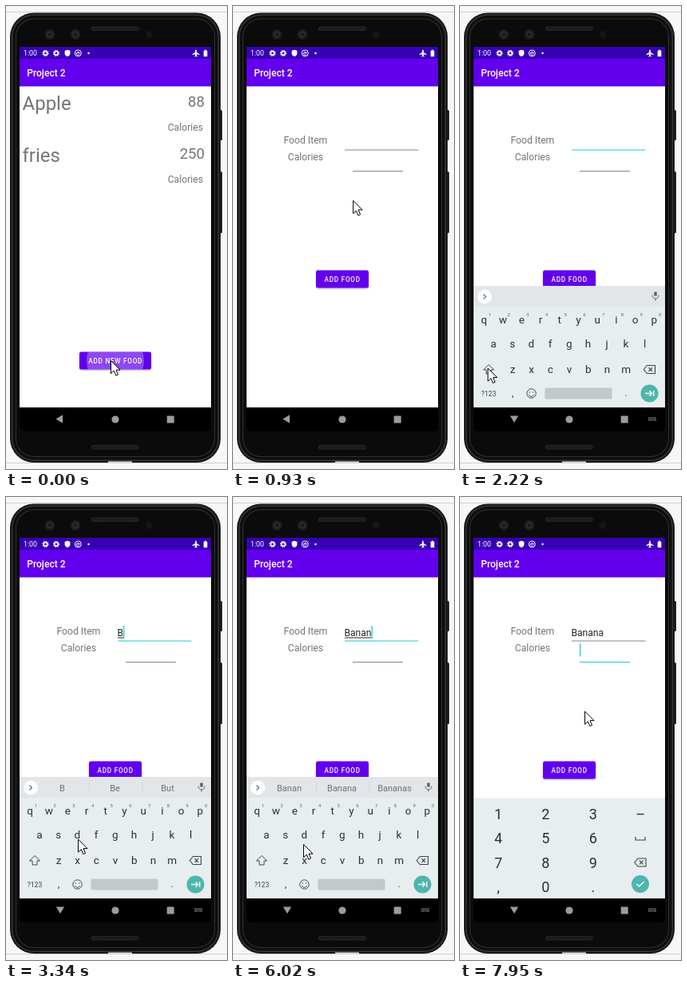
Recreate the animation shown at these times as an HTML page with a canvas. Size 277 by 579 pixels, loop 8000 ms.

```html
<!DOCTYPE html>
<html lang="en">
<head>
<meta charset="utf-8">
<title>Food app</title>
<style>
  html, body { margin: 0; width: 100%; height: 100%; overflow: hidden; background: #f7f7f7; }
  canvas { display: block; width: 277px; height: 579px; }
</style>
</head>
<body>
<canvas id="stage"></canvas>
<script>
const W = 277, H = 579, LOOP = 8000;
const canvas = document.getElementById('stage');
const ctx = canvas.getContext('2d');
const ratio = window.devicePixelRatio || 1;
canvas.width = W * ratio;
canvas.height = H * ratio;

const PURPLE = '#6200ee', DARK = '#3700b3', GREY = '#757575', TEAL = '#1fcfbd',
      KEY = '#37474f', BOARD = '#e8edf0', ENTER = '#4db6ac';

const CLOCK = [[0, 0], [9, 1170], [17, 2220], [25, 3340], [36, 4820], [44, 5900], [52, 6920], [59, 7950], [60, 8085]];
// Pointer path: [step, x, y]
const POINTER = [[0, 131.5, 443.5], [3, 131.5, 443.5], [5, 134, 380], [8, 159, 175], [9, 159.5, 163], [12, 159.5, 163],
  [16, 40, 445], [17, 35, 453], [18, 35, 453], [21, 134, 456], [23, 134, 456], [25, 90.5, 428], [27, 43, 427],
  [29, 43, 427], [31, 182, 454], [32, 182, 454], [34, 103.5, 441], [36, 43, 428], [37, 39, 428], [38, 39, 428],
  [41, 182, 467], [42, 182, 467], [45, 88.5, 434.5], [47, 37, 428], [49, 37, 428], [52, 38, 471], [53, 40, 472],
  [56, 187, 190], [57, 187, 190], [58, 182, 205], [59, 156.5, 268]];
// Typing: [step, text, suggestions]
const TYPING = [[10, '', []], [23, 'B', ['B', 'Be', 'But']], [29, 'Ba', ['Ba', 'Be', 'Bad']],
  [32, 'Ban', ['Ban', 'Can', 'Bank']], [37, 'Bana', ['Bana', 'Banana', 'Bananas']],
  [42, 'Banan', ['Banan', 'Banana', 'Bananas']], [49, 'Banana', ['Banana', 'Banana', 'Bananas']]];
const entryAt = step => TYPING.findLast(e => e[0] <= step) || TYPING[0];

// Piecewise linear lookup of column `out` by column `by`
function track(list, value, by = 0, out = 1) {
  const i = list.findIndex(p => p[by] > value);
  if (i < 0) return list[list.length - 1][out];
  if (i === 0) return list[0][out];
  const a = list[i - 1], b = list[i];
  return a[out] + (b[out] - a[out]) * (value - a[by]) / (b[by] - a[by]);
}

function rect(x, y, w, h, color, radius = 0) {
  ctx.fillStyle = color;
  ctx.beginPath();
  ctx.roundRect(x, y, w, h, radius);
  ctx.fill();
}
function disc(x, y, r, color) {
  ctx.fillStyle = color;
  ctx.beginPath();
  ctx.arc(x, y, r, 0, 7);
  ctx.fill();
}
function text(s, x, y, size, color, align = 'left', weight = 400, spacing = 0) {
  ctx.font = `${weight} ${size}px Roboto, sans-serif`;
  ctx.letterSpacing = spacing + 'px';
  ctx.textAlign = align;
  ctx.fillStyle = color;
  ctx.fillText(s, x, y);
}
function shape(d, x, y, { fill, stroke, width = 1, turn = 0 }) {
  ctx.save();
  ctx.translate(x, y);
  ctx.rotate(turn);
  const path = new Path2D(d);
  if (fill) { ctx.fillStyle = fill; ctx.fill(path); }
  if (stroke) { ctx.strokeStyle = stroke; ctx.lineWidth = width; ctx.stroke(path); }
  ctx.restore();
}
function zoomed(scale, draw) {
  ctx.save();
  ctx.translate(137, 291.5);
  ctx.scale(scale, scale);
  ctx.translate(-137, -291.5);
  draw();
  ctx.restore();
}

function drawPhone() {
  rect(0, 0, W, H, '#f7f7f7');
  rect(0, 7, W, 1, '#cfcfcf');
  rect(0, 571, W, 1, '#cfcfcf');
  rect(266, 130, 5, 38, '#222', 1.5);
  rect(266, 207, 5, 77, '#222', 1.5);
  rect(5, 8.5, 264, 562.5, '#161616', 30);
  for (const [inset, color] of [[2, '#363636'], [3.5, '#0e0e0e'], [7, '#303030'], [8, '#0b0b0b']])
    rect(5 + inset, 8.5 + inset, 264 - 2 * inset, 562.5 - 2 * inset, color, 30 - inset);
  rect(128, 569.5, 30, 2, '#dcdcdc');
  for (const y of [25.5, 549]) {
    rect(107, y, 60, 5.5, '#262626', 2.5);
    for (let x = 109; x < 166; x += 2) rect(x, y + 1, 1, 3.5, '#111');
  }
  for (const x of [55, 87]) {
    disc(x, 35.5, 6.5, '#1d1d1d');
    disc(x, 35.5, 4, '#2c2c2c');
    disc(x, 35.5, 2, '#151515');
  }
  disc(179.5, 35.5, 4.5, '#161616');
}

function drawWindow(content) {
  rect(17, 51, 240, 15.5, DARK);
  rect(17, 66, 240, 35, PURPLE);
  rect(17, 100.5, 240, 402, '#fff');
  rect(17, 502, 240, 30, '#000');
  text('Project 2', 26.2, 88, 12.1, '#fff', 'left', 500);
  content();
}

function button(label, x, y, w, rippleRadius) {
  ctx.save();
  ctx.shadowColor = 'rgba(0,0,0,.3)';
  ctx.shadowBlur = 2.5 * ratio;
  ctx.shadowOffsetY = ratio;
  rect(x, y, w, 22, PURPLE, 2.3);
  ctx.restore();
  if (rippleRadius) {
    ctx.save();
    ctx.beginPath();
    ctx.roundRect(x, y, w, 22, 2.3);
    ctx.clip();
    disc(x + w / 2, y + 11, rippleRadius, 'rgba(255,255,255,.28)');
    ctx.restore();
  }
  text(label, x + w / 2 + .2, y + 14.6, 8.2, '#fff', 'center', 500, .73);
}

function drawList(step) {
  [['Apple', '88', 0], ['fries', '250', 65]].forEach(([food, amount, dy]) => {
    text(food, 20.5, 130 + dy, 24, GREY);
    text(amount, 249, 125.5 + dy, 18.6, GREY, 'right');
    text('Calories', 247, 156 + dy, 12.2, GREY, 'right');
  });
  button('ADD NEW FOOD', 92, 432.5, 90, 36 + step * 10);
}

function drawForm(step) {
  const onCalories = step >= 58, onFood = step >= 10 && !onCalories;
  text('Food Item', 118.3, 172.4, 12.2, GREY, 'right');
  text('Calories', 113.1, 193.2, 12.2, GREY, 'right');
  const [typedAt, word] = entryAt(step);
  text(word, 139.5, 174, 12.1, '#222');
  const end = 139.5 + (word ? ctx.measureText(word).width : 0);
  if (onFood && word) rect(140, 175.5, end - 140, 1, '#222');
  rect(140, 179.5, 92.5, 1, onFood ? TEAL : '#858585');
  rect(150, 206, 63, 1, onCalories ? TEAL : '#858585');
  const since = (step - (onCalories ? 58 : typedAt)) * 134;
  if (since % 1000 < 500) {
    if (onFood) rect(end, 161, 1.3, 16.5, TEAL);
    if (onCalories) rect(150, 183, 1.3, 16.5, TEAL);
  }
  button('ADD FOOD', 104, 330.6, 66);
}

function backspace(x, y) {
  shape('M-7.2 0L-3.2-5H7V5H-3.2ZM-1-2.3L3.6 2.3M3.6-2.3L-1 2.3', x, y, { stroke: KEY, width: 1.1 });
}

function drawLetters(step) {
  const upper = step >= 18 && step < 23;
  rect(17, 350, 240, 152, BOARD);
  rect(17, 350, 240, 26, '#e2e6e9');
  disc(31, 363.5, 9, '#fff');
  shape('M-1.5-3L1.5 0L-1.5 3', 31, 363.5, { stroke: '#5f6a70', width: 1.1 });
  shape('M0-5V0', 245, 362.5, { stroke: '#596268', width: 3.4 });
  shape('M-4-1C-4 5 4 5 4-1M0 3.5V6', 245, 362.5, { stroke: '#596268' });
  entryAt(step)[2].forEach((s, i) => {
    text(s, 70.5 + 66 * i, 367.7, 11, '#66737a', 'center');
    if (i) rect(38 + 66.3 * i, 356, .8, 15, '#cdd2d5');
  });
  ['qwertyuiop', 'asdfghjkl', 'zxcvbnm'].forEach((row, r) => [...row].forEach((c, i) => {
    const x = [30, 42, 66][r] + 23.7 * i;
    text(upper ? c.toUpperCase() : c, x, [397, 427.3, 458.5][r], 13.5, '#263238', 'center');
    if (!r) text((i + 1) % 10, x + 7.5, 388.2, 6, '#5d6a70', 'center');
  }));
  shape('M0-6L6.5 .5H3V5.5H-3V.5H-6.5Z', 36, 454.5, { stroke: KEY, fill: upper ? KEY : '' });
  backspace(237.5, 454.5);
  text('?123', 36, 488, 8.6, KEY, 'center');
  text(',', 66, 488, 13, KEY, 'center');
  text('.', 208, 488, 13, KEY, 'center');
  shape('M5.7 0A5.7 5.7 0 1 1-5.7 0A5.7 5.7 0 1 1 5.7 0M-3 1.5C-2 4.5 2 4.5 3 1.5M-2.8-1.5h1.4M1.4-1.5h1.4', 89.5, 484.5,
    { stroke: KEY });
  rect(106.5, 477.5, 84, 14, '#c3c8cb', 1.5);
  disc(237.5, 484.5, 11, ENTER);
  shape('M-5.5 0H3M0-3.3L3.3 0L0 3.3M5.3-3.5V3.5', 237.5, 484.5, { stroke: '#fff', width: 1.3 });
}

function drawNumbers() {
  rect(17, 376.5, 240, 125.5, BOARD);
  ['123–', '456', '789', ',0.'].forEach((row, r) => [...row].forEach((c, i) =>
    text(c, 48 + 59.4 * i, 402.5 + 30.6 * r, 18, '#263238', 'center')));
  shape('M-6-2V2H6V-2', 226, 427, { stroke: KEY, width: 1.2 });
  backspace(226, 457);
  disc(226, 484, 11, ENTER);
  shape('M-4.5 0L-1.5 3L4.5-3', 226, 484, { stroke: '#fff', width: 1.4 });
}

function drawKeyboard(step) {
  if (step >= 58) return drawNumbers();
  if (step !== 11) return drawLetters(step);
  // Sliding in beneath a translucent navigation bar
  ctx.save();
  ctx.translate(0, 18);
  rect(17, 350, 240, 152, '#fff');
  ctx.globalAlpha = .78;
  drawLetters(step);
  ctx.restore();
  rect(17, 502, 240, 30, 'rgba(0,0,0,.3)');
}

function drawStatus() {
  text('1:00', 22, 62.2, 8.8, '#fff');
  for (const x of [49.5, 63]) {
    ctx.setLineDash([1.5, 1.15]);
    shape('M3.4 0A3.4 3.4 0 1 1-3.4 0A3.4 3.4 0 1 1 3.4 0', x, 59, { stroke: '#fff', width: 1.4 });
    ctx.setLineDash([]);
    shape('M2.2 0A2.2 2.2 0 1 1-2.2 0A2.2 2.2 0 1 1 2.2 0', x, 59, { stroke: '#fff', width: 1.5 });
  }
  shape('M0-4.3L3.4-3V0C3.4 2 2 3.6 0 4.3C-2 3.6-3.4 2-3.4 0V-3Z', 77, 59, { fill: '#fff' });
  shape('M4 0A4 4 0 1 1-4 0A4 4 0 1 1 4 0M1.8 1.5A2 2 0 1 1 2 0H-1', 90.3, 59, { stroke: '#fff' });
  disc(103.5, 59, 1.2, '#fff');
  shape('M0-4.5L.9-3.5V-1L4.5 1.2V2.2L.9 1.2V3L2 4V4.6L0 4L-2 4.6V4L-.9 3V1.2L-4.5 2.2V1.2L-.9-1V-3.5Z', 238, 59, { fill: '#fff' });
  shape('M-2.3-3.2H-1V-4.3H1V-3.2H2.3V4.3H-2.3Z', 250, 59, { fill: '#fff' });
}

function drawNav(step) {
  const color = step === 11 ? '#e4e4e4' : '#9c9c9c';
  const turn = step < 11 ? Math.PI : step === 11 ? .1 : Math.PI / 2;
  shape('M4.5 0L-4-5.2V5.2Z', step < 11 ? 67 : 68, 516.5, { fill: color, turn });
  disc(137, 517, 4.6, color);
  rect(201.7, 512.5, 9, 9, color, .5);
  if (step > 11) {
    rect(236, 514, 10, 5, '#4c4c4c', .5);
    for (let i = 0; i < 8; i++) rect(237.2 + 2.1 * (i % 4), 515 + 1.5 * (i >> 2), .9, .8, '#000');
    rect(239, 518, 4, .6, '#000');
  }
}

function drawScreen(step) {
  ctx.save();
  ctx.beginPath();
  ctx.roundRect(17, 51, 240.5, 481, [1, 1, 7, 7]);
  ctx.clip();
  if (step < 5) {
    const grow = track([[1, 1], [2, 1.015], [3, 1.043], [5, 1.06]], step);
    zoomed(grow, () => drawWindow(() => drawList(step)));
  }
  if (step >= 2) {
    const scale = track([[2, .88], [3, .969], [4, .992], [5, 1]], step);
    zoomed(scale, () => drawWindow(() => drawForm(step)));
  }
  if (step >= 11) drawKeyboard(step);
  drawStatus();
  drawNav(step);
  ctx.restore();
}

function render(now) {
  const step = Math.min(59, Math.floor(track(CLOCK, now % LOOP + 12, 1, 0)));
  ctx.setTransform(ratio, 0, 0, ratio, 0, 0);
  drawPhone();
  drawScreen(step);
  shape('M0 0V16.2L3.8 12.7L6.3 18.6L9 17.4L6.5 11.6H11.5Z', track(POINTER, step), track(POINTER, step, 0, 2),
    { fill: '#fff', stroke: '#000' });
}

const start = performance.now();
function loop() {
  render(performance.now() - start);
  requestAnimationFrame(loop);
}
loop();
</script>
</body>
</html>
```
